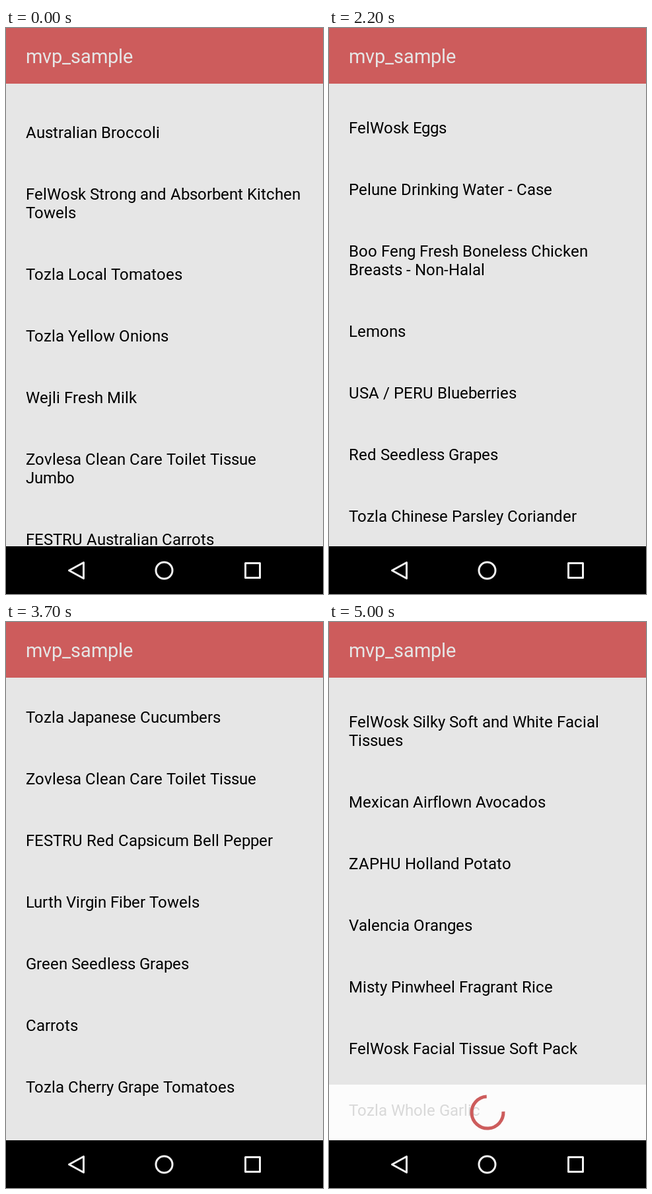
An HTML page for the animation above (5.1 s loop, 480 by 854 pixels).

```html
<!DOCTYPE html>
<html lang="en">
<head>
<meta charset="utf-8">
<title>mvp_sample</title>
<style>
  html, body { margin: 0; width: 100%; height: 100%; overflow: hidden; background: #e6e6e6; }
  #stage {
    position: relative; width: 480px; height: 854px; overflow: hidden;
    background: #e6e6e6; font-family: Roboto, sans-serif;
  }
  #list { position: absolute; left: 30px; top: 144px; will-change: transform; }
  #list div { margin-bottom: 65px; font-size: 24px; line-height: 28px; white-space: pre; color: #000; }
  #bar {
    position: absolute; left: 0; top: 0; width: 450px; height: 84px; padding-left: 30px;
    background: #cd5c5c; color: #e6e6e6; font-size: 29px; line-height: 86px;
  }
  #loader {
    position: absolute; left: 0; top: 698px; width: 480px; height: 84px;
    background: rgba(255, 255, 255, .85); visibility: hidden;
  }
  #nav { position: absolute; left: 0; top: 782px; background: #000; }
  svg { display: block; fill: none; }
</style>
</head>
<body>
<div id="stage">
  <div id="list"></div>
  <div id="bar"></div>
  <div id="loader">
    <svg width="480" height="84">
      <circle id="arc" cx="240" cy="42" r="24" pathLength="360" stroke="#cd5c5c" stroke-width="5"/>
    </svg>
  </div>
  <svg id="nav" width="480" height="72" stroke="#f2f2f2" stroke-width="3" stroke-linejoin="round">
    <path d="M117.5 24.5V48.5L95.5 36.5Z"/>
    <circle cx="239.5" cy="36.5" r="12.5"/>
    <rect x="362.5" y="25.5" width="22" height="22"/>
  </svg>
</div>
<script>
  const LOOP = 5100, STEP = 100;

  const items = [
    'Australian Broccoli',
    'FelWosk Strong and Absorbent Kitchen\nTowels',
    'Tozla Local Tomatoes',
    'Tozla Yellow Onions',
    'Wejli Fresh Milk',
    'Zovlesa Clean Care Toilet Tissue\nJumbo',
    'FESTRU Australian Carrots',
    'FelWosk Eggs',
    'Pelune Drinking Water - Case',
    'Boo Feng Fresh Boneless Chicken\nBreasts - Non-Halal',
    'Lemons',
    'USA / PERU Blueberries',
    'Red Seedless Grapes',
    'Tozla Chinese Parsley Coriander',
    'FelWosk 3-Ply Luxuriously Soft Toilet\nTissue',
    'Tozla Japanese Cucumbers',
    'Zovlesa Clean Care Toilet Tissue',
    'FESTRU Red Capsicum Bell Pepper',
    'Lurth Virgin Fiber Towels',
    'Green Seedless Grapes',
    'Carrots',
    'Tozla Cherry Grape Tomatoes',
    'FelWosk Silky Soft and White Facial\nTissues',
    'Mexican Airflown Avocados',
    'ZAPHU Holland Potato',
    'Valencia Oranges',
    'Misty Pinwheel Fragrant Rice',
    'FelWosk Facial Tissue Soft Pack',
    'Tozla Whole Garlic'
  ];

  // [time in ms, scroll offset in px]
  const scrollKeys = [
    [0, 0], [700, 0], [800, 8], [900, 58], [1400, 403], [1700, 676], [1800, 714],
    [2800, 714], [2900, 725], [3100, 1000], [3300, 1221], [3500, 1381], [3600, 1471],
    [3700, 1521], [4000, 1781], [4100, 1846], [4300, 2080], [4400, 2165], [LOOP, 2165]
  ];

  // [start, end] of each page load
  const loads = [[1800, 2200], [4400, LOOP]];

  const $ = id => document.getElementById(id);
  const list = $('list'), loader = $('loader'), arc = $('arc');
  const pen = document.createElement('canvas').getContext('2d');
  const measure = text => pen.measureText(text).width;

  // Sets text with every kerned glyph advance rounded to whole pixels, as hinted text has it.
  function setText(box, text) {
    const { fontSize, fontFamily } = getComputedStyle(box);
    pen.font = `${fontSize} ${fontFamily}`;
    [...text].forEach((char, i) => {
      const next = (text[i + 1] || '').trim();
      const advance = measure(char + next) - measure(next);
      const glyph = box.appendChild(document.createElement('span'));
      glyph.textContent = char;
      glyph.style.letterSpacing = `${Math.round(advance) - measure(char)}px`;
    });
  }

  setText($('bar'), 'mvp_sample');
  for (const text of items) {
    setText(list.appendChild(document.createElement('div')), text);
  }

  function scrollAt(t) {
    const i = scrollKeys.findIndex(key => key[0] > t);
    const [t0, y0] = scrollKeys[i - 1], [t1, y1] = scrollKeys[i];
    return Math.round(y0 + (y1 - y0) * (t - t0) / (t1 - t0));
  }

  // The arc grows from 16 to 270 degrees while it turns at 230 degrees per second.
  function drawArc(age) {
    const grow = Math.min(1, Math.max(0, (age - 140) / 460));
    const length = 16 + 254 * (0.5 - 0.5 * Math.cos(Math.PI * grow));
    arc.setAttribute('stroke-dasharray', `${length} ${360 - length}`);
    arc.setAttribute('transform', `rotate(${0.23 * age - 141} 240 42)`);
  }

  function draw(now) {
    const t = Math.floor(now % LOOP / STEP) * STEP;
    list.style.transform = `translateY(${-scrollAt(t)}px)`;
    const load = loads.find(([from, to]) => t >= from && t < to);
    loader.style.visibility = load ? 'visible' : 'hidden';
    if (load) drawArc(t - load[0]);
  }

  const start = performance.now();
  function tick() {
    draw(performance.now() - start);
    requestAnimationFrame(tick);
  }
  tick();
</script>
</body>
</html>
```
